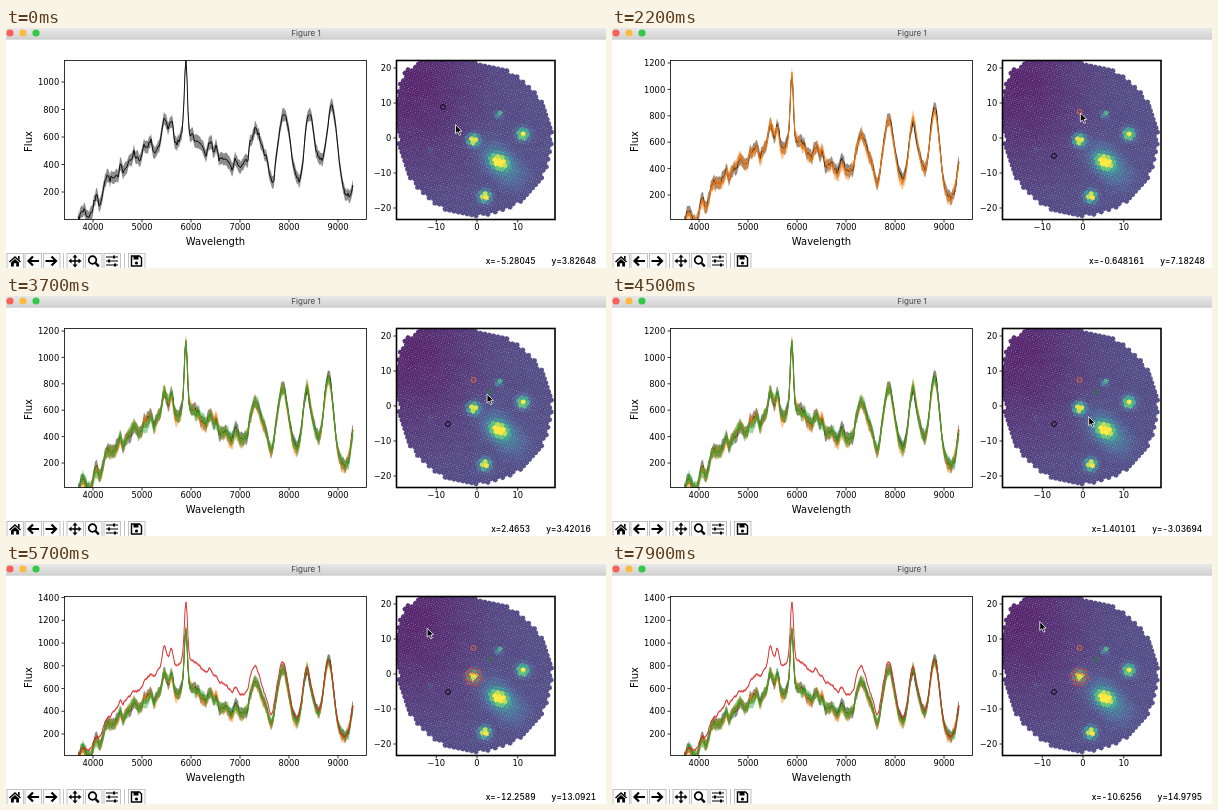
Animation, 600 px wide and 240 px high, one loop 8 s. Source, as an HTML page:

```html
<!DOCTYPE html>
<html lang="en">
<head>
<meta charset="utf-8">
<title>Figure 1</title>
<style>
html, body { margin: 0; width: 100%; height: 100%; overflow: hidden; background: #fff; }
svg { display: block; width: 600px; height: 240px; }
.plot { font-family: "DejaVu Sans", sans-serif; font-size: 8.3px; }
.ui { font-family: Inter, "Liberation Sans", sans-serif; font-size: 8px; }
#status { font-size: 8.3px; font-weight: 500; font-variant-numeric: tabular-nums; }
.axis { fill: none; stroke: #000; stroke-width: .8; }
</style>
</head>
<body>
<svg id="stage" viewBox="0 0 600 240" xmlns="http://www.w3.org/2000/svg">
  <defs>
    <linearGradient id="bar" x2="0" y2="1"><stop stop-color="#e8e8e8"/><stop offset="1" stop-color="#d2d2d2"/></linearGradient>
    <clipPath id="axes"><rect x="58.5" y="32.5" width="302" height="159"/></clipPath>
    <clipPath id="map"><rect x="390.5" y="32.5" width="159" height="159"/></clipPath>
  </defs>
  <rect width="600" height="240" fill="#fff"/>
  <rect width="600" height="11" fill="url(#bar)"/>
  <path d="M0 11.3H600" stroke="#b5b5b5" stroke-width=".6"/>
  <circle cx="4" cy="5" r="3.6" fill="#fc605c"/>
  <circle cx="17" cy="5" r="3.6" fill="#fdbc40"/>
  <circle cx="30" cy="5" r="3.6" fill="#34c749"/>
  <text class="ui" x="300" y="8" text-anchor="middle" fill="#444">Figure 1</text>
  <g id="traces" clip-path="url(#axes)" stroke-linejoin="round"></g>
  <g id="yTicks" class="plot"></g>
  <g id="frame" class="plot"></g>
  <g id="hexes" clip-path="url(#map)"></g>
  <g id="markers" fill="none" stroke-width=".9"></g>
  <rect x="390.5" y="32.5" width="158.5" height="159" fill="none" stroke="#000" stroke-width="1.6"/>
  <g id="toolbar"></g>
  <text id="status" class="ui" y="236" x="535" text-anchor="middle"><tspan id="xText"></tspan><tspan id="yText" dx="16"></tspan></text>
  <path id="cursor" d="M0 0V9L2.1 7.2 3.7 10.6 5.2 9.9 3.7 6.7 6.4 6.5Z" stroke="#fff" stroke-width=".8"/>
</svg>
<script>
const el = id => document.getElementById(id);
const LOOP = 8000, STEP = 100;

// Deterministic random numbers in 0..1
function seeded(seed) {
  return () => {
    seed = (seed + 0x6D2B79F5) | 0;
    let r = Math.imul(seed ^ seed >>> 15, 1 | seed);
    r = r + Math.imul(r ^ r >>> 7, 61 | r) ^ r;
    return ((r ^ r >>> 14) >>> 0) / 4294967296;
  };
}

// Smooth noise in -1..1 with one random value every `spacing` pixels
function smoothNoise(seed, spacing) {
  const random = seeded(seed);
  const values = Array.from({ length: Math.ceil(400 / spacing) }, () => random() * 2 - 1);
  return x => {
    const p = x / spacing, i = Math.floor(p);
    return values[i] + (values[i + 1] - values[i]) * (p - i);
  };
}

const bell = (x, center, width) => Math.exp(-(((x - center) / width) ** 2) / 2);

// Spectral features: center and width in pixels, height in flux
const FEATURES = [
  [175, 35, 300], [158, 1.9, 190], [165, 1.8, 140], [180, 1.6, 510],
  [249, 4.6, 330], [258, 4, 120], [265.5, 2, -90], [277, 5.5, 510],
  [301, 4.5, 520], [310, 3, 130], [322.5, 5, 650], [351, 4.5, 430]
];

function modelFlux(x) {
  const continuum = 310 / (1 + Math.exp((96 - x) / 6)) - 1.5 * Math.max(0, x - 245);
  return FEATURES.reduce((sum, [center, width, height]) => sum + height * bell(x, center, width), continuum);
}

const texture = smoothNoise(19, 2.6);

function makeSpectrum(color, seed, { stretch = 1, error = 45, excess = 0, rough = 1 } = {}) {
  const random = seeded(seed), drift = smoothNoise(seed + 1, 7), samples = [];
  for (let x = 72; x <= 347; x++) {
    const source = x > 240 ? 240 + (x - 240) / stretch : x;
    const bumps = texture(x) * (x < 245 ? 60 : 18) + drift(x) * 26 + (random() - .5) * 40;
    samples.push([x, modelFlux(source) + excess * bell(x, 185, 55) + bumps * rough, error * (.85 + random() * .3)]);
  }
  return { color, samples };
}

const spectra = {
  start: makeSpectrum("#000", 3, { stretch: 1.04 }),
  black: makeSpectrum("#000", 8),
  orange: makeSpectrum("#ff7f0e", 21),
  green: makeSpectrum("#2ca02c", 34),
  red: makeSpectrum("#d62728", 55, { error: 12, excess: 240, rough: .5 })
};

const line = points => "M" + points.map(([x, y]) => `${x} ${y.toFixed(2)}`).join("L");

function spectrumSvg({ color, samples }, { zero, unit }) {
  const row = flux => zero - flux * unit / 200;
  const upper = samples.map(([x, f, e]) => [x, row(f + e)]);
  const lower = samples.map(([x, f, e]) => [x, row(f - e)]).reverse();
  return `<path d="${line(upper.concat(lower))}Z" fill="${color}" opacity=".45"/>` +
    `<path d="${line(samples.map(([x, f]) => [x, row(f)]))}" fill="none" stroke="${color}" stroke-width=".9"/>`;
}

const mapX = x => 471 + 4.07 * x, mapY = y => 110 - 3.5 * y;
const ring = (x, y, color, r = 2.4) => `<circle cx="${x}" cy="${y}" r="${r}" stroke="${color}"/>`;

// Hexagonal lattice tilted by 12 degrees around a center
const PITCH = 4.5, TILT = Math.PI / 15;
function lattice(cx, cy, count, visit) {
  const c = Math.cos(TILT), s = Math.sin(TILT);
  for (let j = -count; j <= count; j++) for (let i = -count; i <= count; i++) {
    const u = (i + (j & 1) / 2) * PITCH, v = j * PITCH * Math.sqrt(3) / 2;
    visit(cx + u * c - v * s, cy + u * s + v * c);
  }
}

function aperture() {
  let svg = "";
  lattice(467.5, 113, 3, (x, y) => {
    const d = Math.hypot(x - 467.5, y - 113);
    if (d > 4 && d < 10) svg += ring(x, y, "#e0362a", 1.3);
  });
  return `<g stroke-width=".8">${svg}</g>`;
}

const marks = {
  start: ring(437, 79, "#000"), black: ring(442, 128, "#000"), orange: ring(467.5, 84, "#e8702a"),
  green: ring(484, 95.5, "#287d38"), red: aperture()
};

// Vertical scale: pixel row of zero flux, pixels per 200 flux, highest tick
const GROUP_SCALE = { zero: 193.4, unit: 26.4, max: 1200 };
const states = [
  { at: 0, scale: { zero: 191.5, unit: 27.5, max: 1000 }, shown: ["start"] },
  { at: 1100, scale: { zero: 193.8, unit: 26.8, max: 1200 }, shown: ["black"] },
  { at: 2000, scale: GROUP_SCALE, shown: ["black", "orange"] },
  { at: 2800, scale: GROUP_SCALE, shown: ["black", "orange", "green"] },
  { at: 5100, scale: { zero: 192.8, unit: 22.75, max: 1400 }, shown: ["black", "orange", "green", "red"] }
];

// Pointer rests: arrival and departure times, position in map units
const rests = [
  [0, 300, -5.28045, 3.82648], [1000, 1300, -6.9137, -5.09596], [1900, 2100, -.90712, 7.42351],
  [2700, 3500, 2.58883, 4.16965], [4500, 4500, 1.40101, -3.03694], [4900, 5200, -.80814, -.87502],
  [5700, 5700, -12.2589, 13.0921], [6700, 6700, -13.1497, 11.891], [7900, LOOP, -10.6256, 14.9795]
];

function pointerAt(t) {
  const next = rests.findIndex(([, leave]) => t <= leave);
  const [arrive, , x1, y1] = rests[next];
  if (t >= arrive) return [x1, y1];
  const [, leave, x0, y0] = rests[next - 1];
  const u = (t - leave) / (arrive - leave), k = u * u * (3 - 2 * u);
  return [x0 + (x1 - x0) * k, y0 + (y1 - y0) * k];
}

const label = (x, y, text, anchor = "middle") => `<text x="${x}" y="${y}" text-anchor="${anchor}">${text}</text>`;
const signed = n => String(n).replace("-", "\u2212");
const xTick = (x, text) => `<path class="axis" d="M${x} 191.5v3"/>` + label(x, 202, text);
const yTick = (x, y, text) => `<path class="axis" d="M${x} ${y}h-3"/>` + label(x - 5.3, y + 3.1, text, "end");

function buildFrame() {
  let svg = '<rect class="axis" x="58.5" y="32.5" width="302" height="159"/>';
  for (let w = 4000; w <= 9000; w += 1000) svg += xTick(87 + (w - 4000) * .049, w);
  for (let v = -10; v <= 10; v += 10) svg += xTick(mapX(v), signed(v));
  for (let v = -20; v <= 20; v += 10) svg += yTick(390.5, mapY(v), signed(v));
  el("frame").innerHTML = svg + `<g font-size="10">${label(209.5, 217, "Wavelength")}` +
    '<text transform="translate(25.5 113.5) rotate(-90)" text-anchor="middle">Flux</text></g>';
}

const VIRIDIS = [[68, 1, 84], [59, 82, 139], [33, 145, 140], [94, 201, 98], [253, 231, 37]];
function viridis(value) {
  const v = Math.max(0, Math.min(.9999, value)) * 4, i = Math.floor(v);
  return `rgb(${VIRIDIS[i].map((c, k) => Math.round(c + (VIRIDIS[i + 1][k] - c) * (v - i)))})`;
}

function blob(x, y, cx, cy, sx, sy = sx, angle = 0) {
  const dx = x - cx, dy = y - cy, c = Math.cos(angle), s = Math.sin(angle);
  return bell(dx * c + dy * s, 0, sx) * bell(dy * c - dx * s, 0, sy);
}

function brightness(x, y) {
  const sky = .17 - .13 * blob(x, y, 408, 58, 45, 60);
  return sky + blob(x, y, 493, 134, 5.8, 4.3, .5) + .27 * blob(x, y, 496, 136, 16, 9, .8) +
    blob(x, y, 467.5, 112.5, 3.7) + .9 * blob(x, y, 517, 106.5, 3.7) +
    blob(x, y, 479, 168.5, 3.6) + .6 * blob(x, y, 493, 86.5, 2) + .07 * blob(x, y, 424, 123, 2);
}

// Round field of view that bulges towards the upper left
function insideField(x, y) {
  const dx = x - 470, dy = y - 112;
  const bulge = Math.max(0, Math.cos(Math.atan2(dy, dx) + 2.3)) ** 6;
  return Math.hypot(dx, dy) < 76 + 22 * bulge;
}

function buildHexes() {
  const random = seeded(12);
  const corners = Array.from({ length: 6 }, (_, i) => TILT + i * Math.PI / 3)
    .map(a => [2.8 * Math.sin(a), 2.8 * Math.cos(a)]);
  let svg = "";
  lattice(470, 112, 27, (x, y) => {
    if (!insideField(x, y)) return;
    const hex = corners.map(([a, b]) => `${(x + a).toFixed(1)},${(y + b).toFixed(1)}`).join(" ");
    svg += `<polygon points="${hex}" fill="${viridis(brightness(x, y) + (random() - .5) * .025)}"/>`;
  });
  el("hexes").innerHTML = `<g fill-opacity=".86">${svg}</g>`;
}

function buildToolbar() {
  const arrow = '<path d="M6 0H-4M0-4.5L-4.5 0 0 4.5" fill="none" stroke="#000" stroke-width="2.2"/>';
  const turns = art => [0, 90, 180, 270].map(a => `<g transform="rotate(${a})">${art}</g>`).join("");
  const icons = [
    [9, '<path d="M-6 .5L0-5 6 .5 5 1.5 0-3-5 1.5Z"/><path d="M-4 1.5L0-2 4 1.5V5.5H1.2V2.2H-1.2V5.5H-4Z"/><path d="M3-5h1.6v4L3-2.5Z"/>'],
    [27, arrow],
    [45.5, `<g transform="scale(-1 1)">${arrow}</g>`],
    [69, turns('<path d="M0-6.5L2.5-3.5H.7V0H-.7V-3.5H-2.5Z"/>')],
    [87.5, '<circle cx="-1" cy="-1" r="3.8" fill="none" stroke="#000" stroke-width="1.7"/><path d="M2 2L5.3 5.3" stroke="#000" stroke-width="2.4"/>'],
    [106, '<path d="M-6-4H6M-6 0H6M-6 4H6" stroke="#000" stroke-width="1.2"/><path d="M1-5.5h2v3h-2ZM-4-1.5h2v3h-2ZM2 2.5h2v3h-2Z"/>'],
    [130.5, '<path d="M-5-5H3L5-3V5H-5Z" fill="none" stroke="#000" stroke-width="1.4"/><path d="M-3-5H2V-1.5H-3Z"/><circle cy="2" r="1.6"/>']
  ];
  el("toolbar").innerHTML = icons.map(([x, art]) =>
    `<rect x="${x - 8}" y="225.5" width="16.5" height="16" fill="#fbfbfb" stroke="#b4b4b4" stroke-width=".8"/>` +
    `<g transform="translate(${x} 233)">${art}</g>`).join("") +
    '<path d="M57.5 225V240M118.5 225V240" stroke="#b4b4b4" stroke-width=".8"/>';
}

let current;
function showState(state) {
  if (state === current) return;
  current = state;
  const { scale, shown } = state;
  el("traces").innerHTML = shown.map(name => spectrumSvg(spectra[name], scale)).join("");
  el("markers").innerHTML = shown.map(name => marks[name]).join("");
  let ticks = "";
  for (let f = 200; f <= scale.max; f += 200) ticks += yTick(58.5, scale.zero - f * scale.unit / 200, f);
  el("yTicks").innerHTML = ticks;
}

function render(now) {
  const t = Math.floor((now % LOOP) / STEP) * STEP;
  showState(states.filter(s => s.at <= t).pop());
  const [x, y] = pointerAt(t);
  el("cursor").setAttribute("transform", `translate(${mapX(x).toFixed(2)} ${mapY(y).toFixed(2)})`);
  el("xText").textContent = "x=" + Number(x.toPrecision(6));
  el("yText").textContent = "y=" + Number(y.toPrecision(6));
}

buildFrame();
buildHexes();
buildToolbar();
const begin = performance.now();
function tick() {
  render(performance.now() - begin);
  requestAnimationFrame(tick);
}
tick();
</script>
</body>
</html>
```
